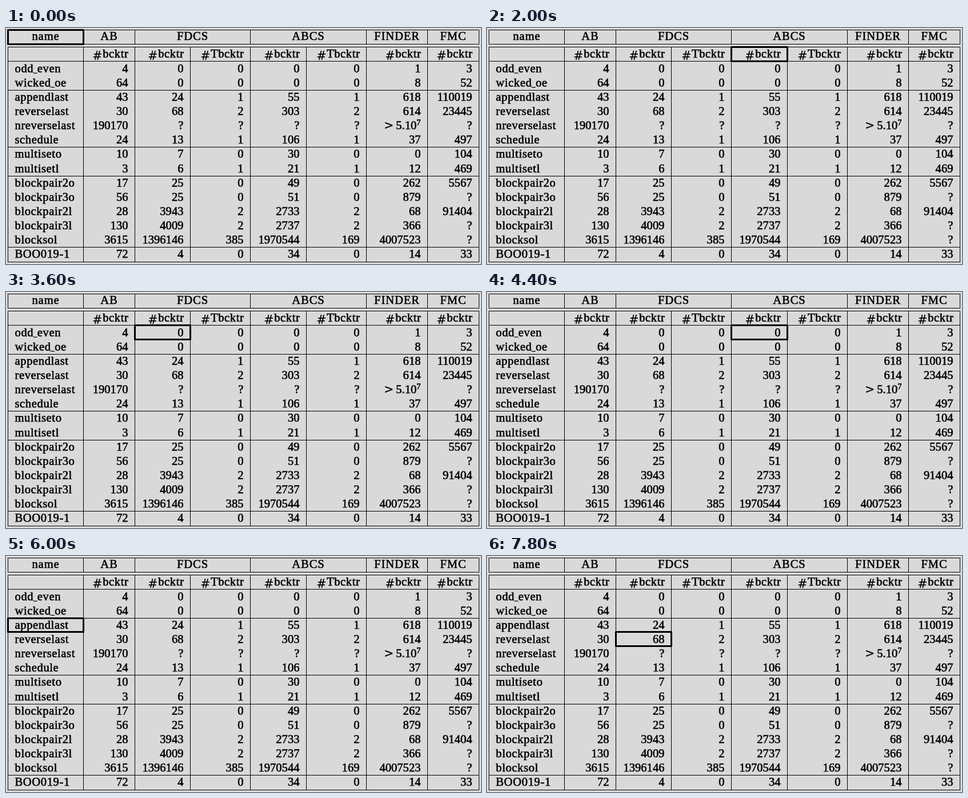
An HTML page that plays this animation: 831 by 415 pixels, repeating every 8000 ms.

```html
<!DOCTYPE html>
<html lang="en">
<head>
<meta charset="utf-8">
<title>Table cell scan</title>
<style>
html, body { margin: 0; width: 100%; height: 100%; overflow: hidden; background: #d9d9d9; }
svg { display: block; width: 100%; height: 100%; }
text { font: 20.6px "Liberation Serif", "Times New Roman", serif; stroke: #000; stroke-width: .6; }
.word { letter-spacing: .6px; }
.head { letter-spacing: .9px; text-anchor: middle; }
.num { text-anchor: end; }
.sign { font-family: "DejaVu Sans", sans-serif; stroke-width: .2; }
.bar { font-size: 12px; }
.sup { font-size: 14.5px; }
#rules { stroke: #000; fill: none; }
#cursor { stroke: #000; stroke-width: 3; stroke-linejoin: round; fill: none; }
</style>
</head>
<body>
<svg viewBox="0 0 831 415">
  <path id="rules"/>
  <g id="texts"></g>
  <rect id="cursor"/>
</svg>
<script>
const STEP = 200, LOOP = 8000, PITCH = 25.15, PAD = 12;
const cols = [3.5, 135.5, 225.5, 322.5, 427.5, 525.5, 630.5, 737.5, 827.5];
const bands = [[3.5, 28.5], [33.5, 58.5]];
const heads = ['name', 'AB', 'FDCS', 'ABCS', 'FINDER', 'FMC'];
const isWide = name => name.endsWith('CS');

// Blank lines mark the ruled groups
const groups = `odd_even 4 0 0 0 0 1 3
wicked_oe 64 0 0 0 0 8 52

appendlast 43 24 1 55 1 618 110019
reverselast 30 68 2 303 2 614 23445
nreverselast 190170 ? ? ? ? >5.10^7 ?
schedule 24 13 1 106 1 37 497

multiseto 10 7 0 30 0 0 104
multisetl 3 6 1 21 1 12 469

blockpair2o 17 25 0 49 0 262 5567
blockpair3o 56 25 0 51 0 879 ?
blockpair2l 28 3943 2 2733 2 68 91404
blockpair3l 130 4009 2 2737 2 366 ?
blocksol 3615 1396146 385 1970544 169 4007523 ?

BOO019-1 72 4 0 34 0 14 33`.split('\n\n').map(g => g.split('\n').map(r => r.split(' ')));

const $ = id => document.getElementById(id);
const ruleY = i => Math.floor(58.95 + PITCH * i) + .5;

const markup = s => s
  .replace('>', '<tspan class="sign">&gt;</tspan><tspan dx="4">')
  .replace('_', '<tspan class="bar">_</tspan>')
  .replace(/\^(.)/, '</tspan><tspan class="sup" dy="-7">$1</tspan>')
  .replace(/#(.)/, '<tspan class="sign" dy="3.5">#</tspan><tspan dy="-3.5">$1</tspan>');
const label = (s, x, y, cls) => `<text class="${cls}" x="${x}" y="${y}">${markup(s)}</text>`;

let texts = '', rules = '';
const cells = [];
const hline = y => { rules += `M3 ${y}H828`; };
const vline = (c, top, end) => { rules += `M${cols[c]} ${top}V${end}`; };
const addCell = (a, b, top, end) => cells.push([cols[a], top, cols[b] - cols[a], end - top]);

// Title band, with the wide titles over two columns, then the subtitle band
function addHeader() {
  bands.flat().forEach(hline);
  const [[top, end], [subTop, subEnd]] = bands;
  let c = 0;
  vline(0, top, end);
  for (const name of heads) {
    const next = c + (isWide(name) ? 2 : 1);
    texts += label(name, (cols[c] + cols[next]) / 2, 21, 'head');
    for (let k = c; k < next && c; k++) {
      texts += label(k > c ? '#Tbcktr' : '#bcktr', cols[k + 1] - PAD + 1, 52, 'num word');
    }
    addCell(c, next, top, end);
    vline(next, top, end);
    c = next;
  }
  for (let k = 0; k < c; k++) addCell(k, k + 1, subTop, subEnd);
}

// Ruled groups are scanned down each column in turn
function addBody() {
  let first = 0;
  for (const group of groups) {
    const edge = r => ruleY(first + r) - (r % group.length ? 1 : 0);
    for (let c = 0; c < cols.length - 1; c++) {
      group.forEach((row, r) => {
        const y = 77.5 + PITCH * (first + r);
        texts += c ? label(row[c], cols[c + 1] - PAD, y, 'num') : label(row[c], cols[0] + PAD, y, 'word');
        addCell(c, c + 1, edge(r), edge(r + 1));
      });
    }
    first += group.length;
    hline(ruleY(first));
  }
  cols.forEach((_, c) => vline(c, bands[1][0], ruleY(first)));
}

function render(t) {
  const cell = cells[Math.floor(t % LOOP / STEP)];
  ['x', 'y', 'width', 'height'].forEach((k, i) => $('cursor').setAttribute(k, cell[i]));
}

function tick() {
  render(performance.now());
  requestAnimationFrame(tick);
}

addHeader();
addBody();
$('texts').innerHTML = texts;
$('rules').setAttribute('d', rules);
tick();
</script>
</body>
</html>
```
